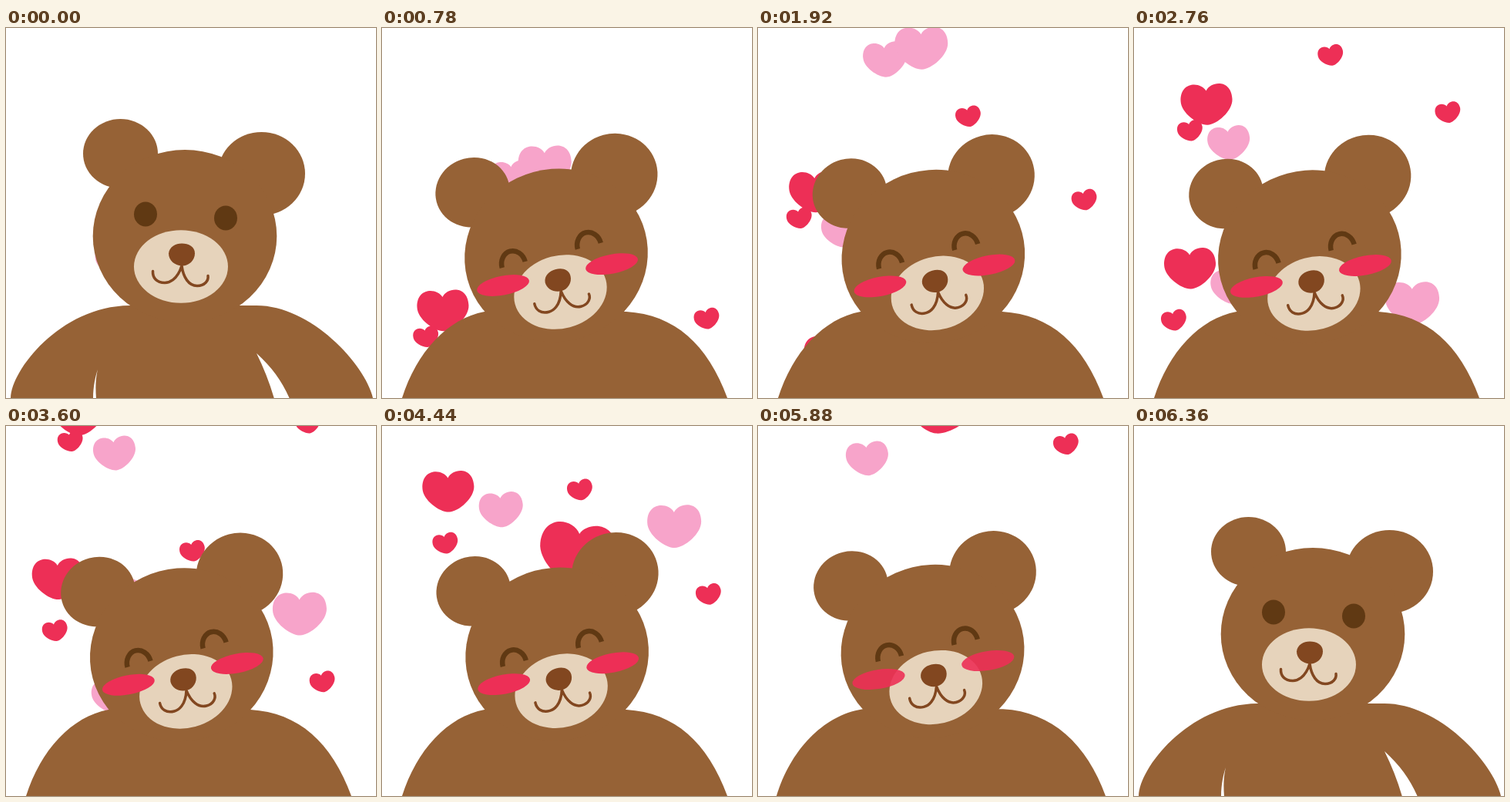
Animation of 480 by 480 pixels, one loop 6.48 s. Source, as an HTML page with a canvas:

```html
<!DOCTYPE html>
<html>
<head>
<meta charset="utf-8">
<title>Bear hug</title>
<style>
  html, body { margin: 0; height: 100%; overflow: hidden; background: #fff; }
  canvas { display: block; }
</style>
</head>
<body>
<canvas id="stage" width="480" height="480"></canvas>
<script>
const g = document.getElementById('stage').getContext('2d');
const SIZE = 480, LOOP = 6480, STEP = 60, LAST = 6360, SWAY = 1080;
const FUR = '#966236', RED = '#ed2f56', PINK = '#f7a4ca', DARK = '#603913', NOSE = '#824720';

// Hearts in a lane share one swaying path; peak is the age in ms of the widest swing to the right.
const lanes = [
  { x: 155, peak: 938, size: 57, color: PINK, launches: [-1330] },
  { x: 196, peak: 106, size: 69, color: PINK, launches: [-1440] },
  { x: 126, peak: 1070, size: 55, color: PINK, launches: [310, 2640] },
  { x: 140, peak: 659, size: 57, color: PINK, launches: [1690] },
  { x: 368, peak: 565, size: 70, color: PINK, launches: [1850] },
  { x: 82, peak: 540, size: 67, color: RED, launches: [-60, 1515] },
  { x: 68, peak: 190, size: 33, color: RED, launches: [195, 2015] },
  { x: 408, peak: 855, size: 33, color: RED, launches: [20, 2505] },
  { x: 258, peak: 680, size: 33, color: RED, launches: [-1942, 240], speed: .0945 },
  { x: 238, peak: 230, size: 98, color: RED, launches: [2110] }
];

const heart = new Path2D('M0-.26C-.1-.45-.5-.47-.5-.08C-.5.15-.18.4 0 .4C.18.4.5.15.5-.08C.5-.47.1-.45 0-.26Z');
const gaps = new Path2D('M113 481C113 465 116 452 119 443C116 455 116 468 117 481Z' +
  'M325 422C334 440 342 460 348 481H368C358 458 345 440 325 422Z');
const nose = new Path2D('M-16-17C-15-26-7-30 1-30C10-30 18-26 18-17C18-8 10-1 2-1C-8-1-16-8-16-17Z');
const mouth = new Path2D('M1-1C-5 18-16 21-21 21C-32 21-37 14-36.5 6M1-1C3 14 10 25 21 25C31 25 36 18 35 12');

const clamp = v => Math.min(1, Math.max(0, v));
const ease = v => { v = clamp(v); return v * v * (3 - 2 * v); };
const rad = deg => deg * Math.PI / 180;

function oval(x, y, rx, ry, color, turn = 0) {
  g.fillStyle = color;
  g.beginPath();
  g.ellipse(x, y, rx, ry, rad(turn), 0, 7);
  g.fill();
}

function drawHeart(x, y, size, color) {
  g.save();
  g.translate(x, y);
  g.rotate(rad((size - 75) / 3.3));
  g.scale(size, size);
  g.fillStyle = color;
  g.fill(heart);
  g.restore();
}

function drawHearts(t) {
  for (const { x, peak, size, color, launches, speed = .1351 } of lanes) {
    for (const launch of launches) {
      const age = t - launch;
      const swing = 16 * Math.cos((age - peak) / SWAY * 2 * Math.PI);
      drawHeart(x + swing, SIZE - speed * age, size, color);
    }
  }
}

function drawBody(hug) {
  const mix = (relaxed, hugging) => relaxed + (hugging - relaxed) * hug;
  const neck = mix(360, 368);
  g.fillStyle = FUR;
  g.beginPath();
  g.moveTo(mix(6, 26), SIZE);
  g.bezierCurveTo(mix(6, 45), mix(445, 420), mix(70, 85), mix(361, 377), mix(160, 133), neck);
  g.lineTo(mix(325, 317), neck);
  g.bezierCurveTo(mix(395, 380), mix(360, 372), mix(465, 422), mix(435, 410), mix(476, 448), SIZE);
  g.fill();

  // the gaps beside the arms slide out of sight
  g.save();
  g.translate(0, 150 * hug);
  g.fillStyle = '#fff';
  g.fill(gaps);
  g.restore();
}

function drawEye(side, hug) {
  if (hug < .5) {
    oval(6 + 52 * side, -65.5 + 2.5 * side, 15, 16, DARK);
    return;
  }
  g.lineWidth = 6.5;
  g.strokeStyle = DARK;
  g.beginPath();
  g.ellipse(1 + 50.5 * side, -49 + side, 15.5, 18, 0, Math.PI, 0);
  g.stroke();
}

function drawHead(hug, drift) {
  g.save();
  g.translate(227 + 4.3 * hug + drift, 309.5 + 24.8 * hug + drift);
  g.rotate(rad(-15 * hug));
  oval(-78.5, -146.5, 48.5, 45, FUR);
  oval(104.5, -120.5, 56.5, 54, FUR);
  oval(5, -39.5, 119.3, 112, FUR);

  g.translate(-2 * hug, 7.9 * hug);
  oval(0, 0, 61, 47.3, '#e6d3bb');
  g.fillStyle = NOSE;
  g.fill(nose);
  g.lineCap = 'round';
  g.lineWidth = 3.5;
  g.strokeStyle = NOSE;
  g.stroke(mouth);
  g.lineCap = 'butt';
  for (const side of [-1, 1]) {
    drawEye(side, hug);
    g.globalAlpha = hug;
    oval(2 + 71.7 * side, -22.7 + 4.8 * side, 34.5, 12.5, RED, 4);
    g.globalAlpha = 1;
  }
  g.restore();
}

function draw(now) {
  const t = Math.min(LAST, Math.floor(now % LOOP / STEP) * STEP);
  const hug = ease(t / 600) * (1 - ease((t - 5760) / 600));
  const drift = 2 * Math.sin(Math.PI * clamp((t - 720) / 4680));
  g.clearRect(0, 0, SIZE, SIZE);
  if (t < LAST) drawHearts(t);
  drawBody(hug);
  drawHead(hug, drift);
}

const start = performance.now();
function tick() {
  draw(performance.now() - start);
  requestAnimationFrame(tick);
}
tick();
</script>
</body>
</html>
```
